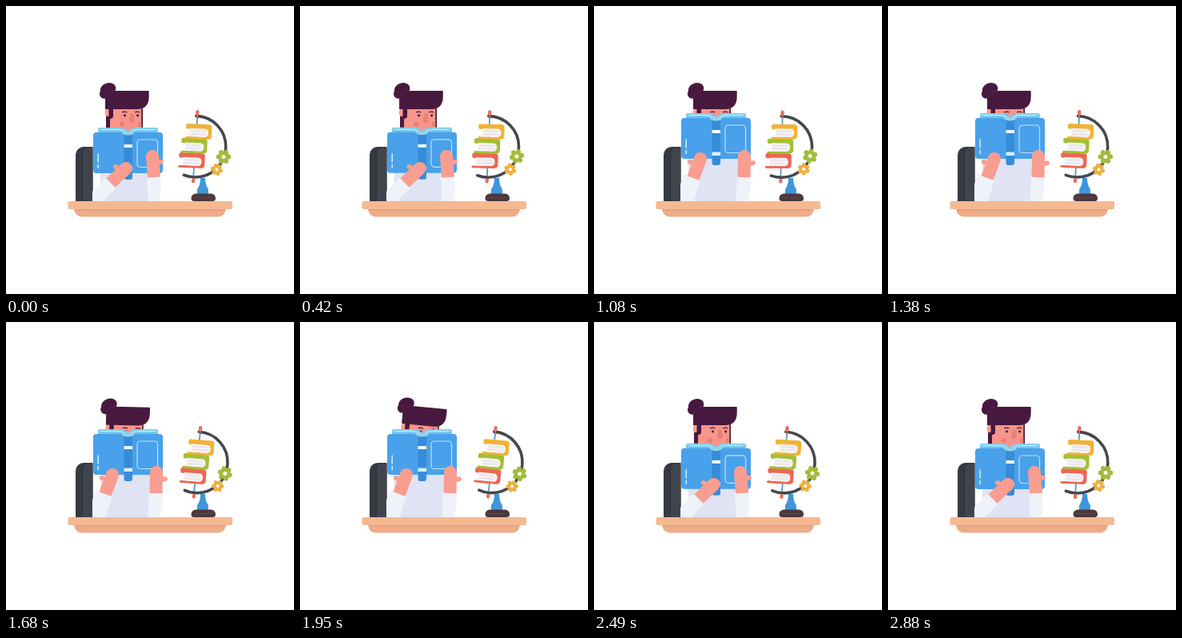
An HTML page with a canvas that plays this animation: 360x360 px, repeating every 2.91 s.

```html
<!DOCTYPE html>
<html lang="en">
<head>
<meta charset="utf-8">
<title>Reading at the desk</title>
<style>
html, body { margin: 0; width: 100%; height: 100%; overflow: hidden; background: #fff; }
canvas { display: block; width: 360px; height: 360px; }
</style>
</head>
<body>
<canvas id="stage"></canvas>
<script>
const LOOP = 2910, STEP = 30;
const canvas = document.getElementById('stage');
const c = canvas.getContext('2d');
const dpr = window.devicePixelRatio || 1;
canvas.width = canvas.height = 360 * dpr;

const SKIN = '#f99d90', FACE = '#f69589', HAIR = '#48193e', BLUE = '#48a1ea';
const SLEEVE = '#f0f2fa', SHIRT = '#dfe3f4', DARK = '#46474d', RED = '#e9705f';

const lerp = (a, b, k) => a + (b - a) * k;
const smooth = k => k * k * (3 - 2 * k);

// Eased value through [time, value] keys
function track(keys, t) {
  for (let i = 1; i < keys.length; i++) {
    const [t0, v0] = keys[i - 1], [t1, v1] = keys[i];
    if (t <= t1) return lerp(v0, v1, smooth(Math.max(0, (t - t0) / (t1 - t0))));
  }
  return keys[keys.length - 1][1];
}

const LIFT = [[400, 0], [760, 1], [2130, 1], [2510, 0]];
const NOD = [[400, 0], [710, 7], [1060, 0], [1480, 0], [2150, 7], [2510, 0]];
const SWAY = [[0, 0], [880, -2.5], [1950, 2.8], [LOOP, 0]];

function box(x, y, w, h, r, fill) {
  c.fillStyle = fill;
  c.beginPath();
  c.roundRect(x, y, w, h, r);
  c.fill();
}

function oval(x, y, rx, ry, fill, turn = 0) {
  c.fillStyle = fill;
  c.beginPath();
  c.ellipse(x, y, rx, ry, turn, 0, Math.PI * 2);
  c.fill();
}

function shape(d, fill) {
  c.fillStyle = fill;
  c.fill(new Path2D(d));
}

function line(d, color, width, cap = 'round') {
  c.strokeStyle = color;
  c.lineWidth = width;
  c.lineCap = cap;
  c.stroke(new Path2D(d));
}

function turned(x, y, deg, draw) {
  c.save();
  c.translate(x, y);
  c.rotate(deg * Math.PI / 180);
  draw();
  c.restore();
}

function drawChair() {
  box(87, 176, 21.5, 68, [10, 0, 0, 0], '#353a42');
  box(95.5, 177, 13, 67, [7, 0, 0, 0], '#40454d');
  line('M95.5 244V184q0-6 5-7', '#2a2e35', 0.8, 'butt');
}

function drawDesk() {
  box(85.5, 252, 189, 11.5, [0, 0, 9, 9], '#f0ab88');
  box(85.5, 252, 189, 3.8, 0, '#e29f80');
  box(77.5, 244, 205.5, 10, 2, '#f5b992');
}

function drawHead(deg) {
  turned(148, 160, deg, () => {
    c.translate(-148, -160);
    shape('M125 128H171V152H125Z', HAIR);
    oval(127, 133.3, 3.4, 5, SKIN);
    shape('M130 127H169.3V155q0 11-11 11H142q-12 0-12-12Z', FACE);
    shape('M128.5 127H134V137q0 4-4 4h-1.5Z', HAIR);
    line('M145.5 132.8q2.8-1.4 5.4 0M161.5 132.8q2.8-1.4 5.4 0', HAIR, 1.2);
    oval(148.5, 136.8, 1.5, 1.6, HAIR);
    oval(164.6, 136.8, 1.5, 1.6, HAIR);
    shape('M155 134.5h4.3l1.5 8.5q0 3-3.4 3t-3.4-3Z', '#ea8176');
    oval(145, 148, 3.3, 3, '#ec7f75');
    oval(167, 148, 2.4, 3, '#ec7f75');
    shape('M124 107q0-1 1-1H177.7q1 0 1 1v6q0 16-15 16H124Z', HAIR);
    oval(127.5, 104, 10, 7.7, HAIR, -0.35);
    oval(122.5, 109.8, 5.6, 6, HAIR);
    line('M124 116q1-9 11-10', '#5c2c50', 0.7);
  });
}

// Open book, local origin at the top of its cover
function drawReader(y) {
  c.save();
  c.translate(0, y);
  shape('M115 2V-4q0-2 2-2H141q9 0 11.5 5Q155-6 164-6H188q2 0 2 2V2Z', '#82cdee');
  line('M119-3.5h20q8 0 11 4M155 .5q3-4 11-4h20', '#cdeef7', 1);
  line('M117-1h22q7 0 10 3M156 2q3-3 10-3h22', '#5ab3e4', 0.8);
  shape('M113 0H143q5 0 7 3h5q2-3 7-3h30q4 0 4 4V47q0 4-4 4H113q-4 0-4-4V4q0-4 4-4Z', BLUE);
  shape('M147.5 1.5q5 3.5 10.5 0V56q0 3-3 3h-4.5q-3 0-3-3Z', '#368cd8');
  shape('M144 0q5-3 8.7 0q3.7-3 8.3 0q-3 3.5-8.4 3.5T144 0Z', '#92d6ee');
  box(147.5, 15, 10.5, 4, 0, '#f0f8fc');
  box(147.5, 42.5, 10.5, 4.5, 0, '#d9eefa');
  c.strokeStyle = '#bfe1f7';
  c.lineWidth = 1.2;
  c.beginPath();
  c.roundRect(164, 9, 25.5, 34.5, 4);
  c.stroke();
  line('M115.2 27v10M115.2 40.5v4', '#d8effb', 1.5);
  c.restore();
}

function drawArms(u) {
  const p = (x0, y0, x1, y1) => [lerp(x0, x1, u), lerp(y0, y1, u)];
  const poly = (pts, fill) => {
    c.fillStyle = fill;
    c.beginPath();
    pts.forEach(q => c.lineTo(...q));
    c.closePath();
    c.fill();
  };
  const limb = (hand, wrist) => {
    line(`M${hand}L${wrist}`, SKIN, 16, 'butt');
    oval(...hand, 8, 8, SKIN);
  };

  const handL = p(150, 203, 133, 191), wristL = p(131, 221, 124, 215);
  const handR = p(183, 188, 188, 188), wristR = p(185, 214, 187.5, 214);
  oval(...p(138, 201.5, 121, 195.5), 4.5, 3, SKIN, 0.4);
  oval(...p(192.5, 195, 197.5, 196.5), 4.5, 3, SKIN, -0.2);
  poly([p(124, 215, 112, 210), p(138, 228, 133, 218), p(130, 235, 129, 230),
        p(122, 244, 125, 244), [108, 244], p(108, 232, 108, 223)], SLEEVE);
  poly([p(176, 213, 179, 212), p(193, 213, 196, 212), p(194, 232, 195.5, 230),
        p(191, 244, 192, 244), [177.5, 244]], SLEEVE);
  limb(handL, wristL);
  limb(handR, wristR);
}

function drawStackBook(x, y, color, pageTint) {
  turned(x, y, 2.5, () => {
    c.scale(1, 0.94);
    shape('M-14-10H12q4 0 4 4V5q0 5-5 5H-15q-2 0-2-1.5T-15 7H9V-3H-14q-2.5 0-2.5-3.5T-14-10Z', color);
    shape('M-12-4H7q5 0 5 5.5T7 7H-13q3-5 1-11Z', '#f4f1f4');
    line('M-10-.5H8M-10 3.5H8', pageTint, 0.8);
    line('M-15 8.4H10', color, 2.2);
  });
}

function drawGear(x, y, r, color, deg) {
  turned(x, y, deg, () => {
    for (let i = 0; i < 6; i++) {
      const a = i * Math.PI / 3;
      oval(Math.cos(a) * r * 0.7, Math.sin(a) * r * 0.7, r * 0.33, r * 0.33, color);
    }
    oval(0, 0, r * 0.74, r * 0.74, color);
    oval(0, 0, r * 0.28, r * 0.28, '#fff8e8');
  });
}

function drawGlobe(deg) {
  shape('M243 215h6q0 9 3.9 14v8H239v-8q4-5 4-14Z', '#4096dc');
  turned(246, 240, deg, () => {
    c.translate(-246, -240);
    line('M239.5 135L234 217', '#5a9ac8', 1.8);
    c.strokeStyle = DARK;
    c.lineWidth = 3.6;
    c.lineCap = 'round';
    c.beginPath();
    c.arc(236.5, 175.7, 38.3, -1.54, 1.95);
    c.stroke();
    line('M239.4 132.3l-.2 2', RED, 4.4);
    line('M239.2 134v4', RED, 2);
    line('M234.2 217.5l-.2 1.5', RED, 4.4);
    drawStackBook(232.5, 193, '#ed6754', '#dcd3da');
    drawStackBook(235.5, 174.8, '#a3bf36', '#dcd9df');
    drawStackBook(241.2, 157, '#f2b235', '#ded8dc');
    drawGear(272, 188.5, 9, '#a0bc3c', deg * 8);
    drawGear(263.5, 204.5, 7.5, '#eeb13e', 15 - deg * 8);
  });
  shape('M237 234.5H256.5q5.5 1 5.5 6 0 3.5-4 3.5H235.5q-4 0-4-3.5 0-5 5.5-6Z', '#4c383d');
  line('M236 239.5h21', '#5d484b', 1);
}

function draw(t) {
  const u = track(LIFT, t);
  c.setTransform(dpr, 0, 0, dpr, 0, 0);
  c.fillStyle = '#fff';
  c.fillRect(0, 0, 360, 360);
  drawChair();
  shape('M118 244V186q0-18 17-18h37q18 0 18 18v58Z', SHIRT);
  box(143, 157, 17, 17, 3, '#ea8a7e');
  drawHead(track(NOD, t));
  drawReader(lerp(158, 140, u));
  drawArms(u);
  drawGlobe(track(SWAY, t));
  drawDesk();
}

const start = performance.now();
function tick() {
  let i = Math.floor(((performance.now() - start) % LOOP) / STEP);
  if (i > 1 && i % 18 === 1) i--; // short regular hold
  draw(i * STEP);
  requestAnimationFrame(tick);
}
tick();
</script>
</body>
</html>
```
